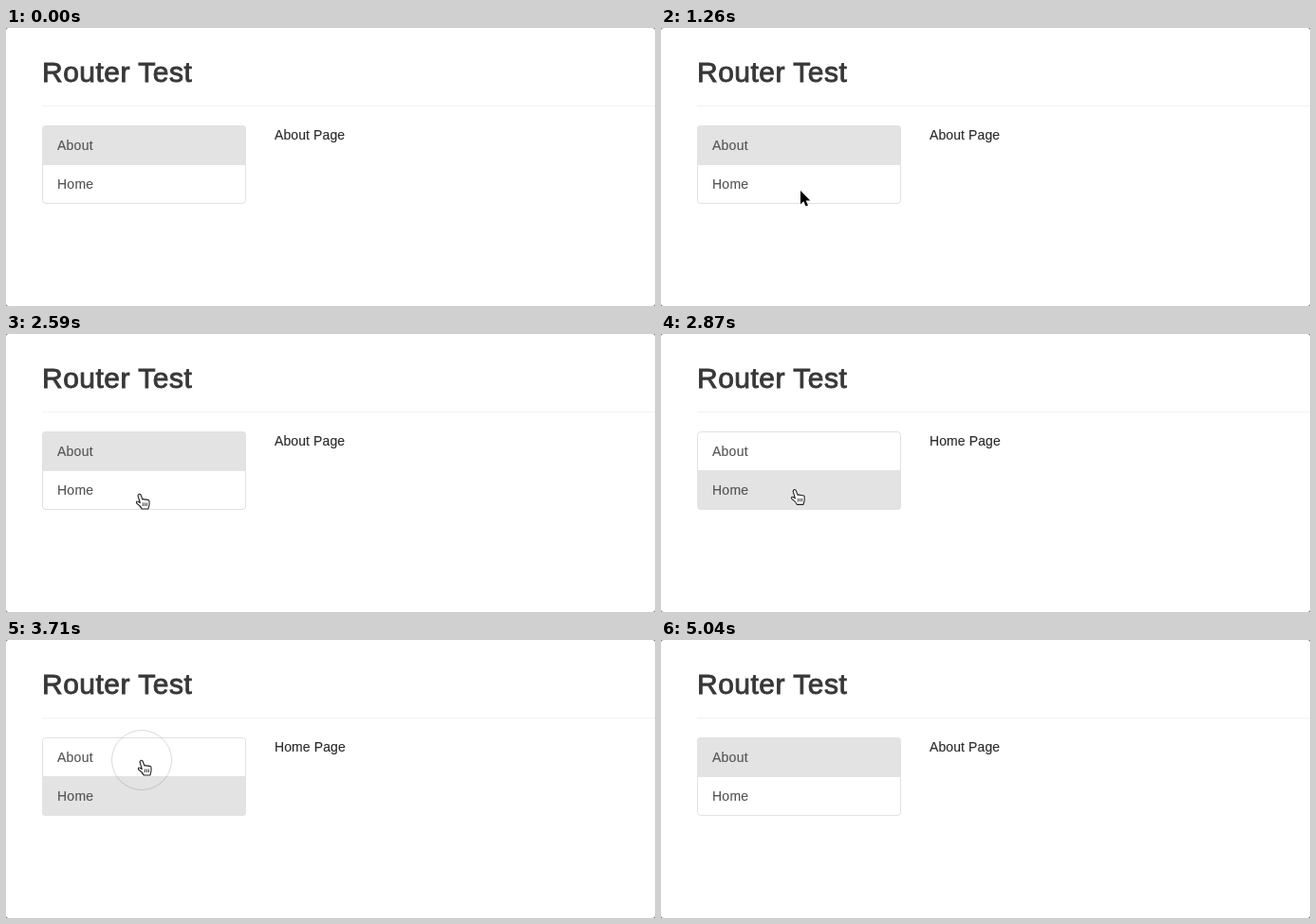
Recreate the animation shown at these times as an HTML page. Size 684 by 294 pixels, loop 5180 ms.

```html
<!DOCTYPE html>
<html lang="en">
<head>
<meta charset="utf-8">
<title>Router Test</title>
<style>
  html, body { margin: 0; width: 100%; height: 100%; overflow: hidden; background: #777; }
  svg { display: block; width: 684px; height: 294px; }
  text { font: 14px "Liberation Sans", Arial, sans-serif; letter-spacing: .1px; fill: #2b2b2b; stroke: #2b2b2b; stroke-width: .15px; }
  .title { font-size: 30px; letter-spacing: .5px; fill: #383838; stroke: #383838; stroke-width: .9px; }
  .item { letter-spacing: .25px; fill: #555; stroke: #555; }
  .box { fill: none; stroke: #e1e1e1; }
</style>
</head>
<body>
<svg viewBox="0 0 684 294">
  <clipPath id="listShape"><rect x="38" y="103" width="215" height="83" rx="4"/></clipPath>
  <rect width="684" height="294" rx="3" fill="#fff"/>
  <text class="title" x="38" y="57">Router Test</text>
  <path d="M38 82.5H684" stroke="#f2f2f2"/>

  <rect class="box" x="38.5" y="103.5" width="214" height="82" rx="3.5"/>
  <g clip-path="url(#listShape)"><rect id="active" x="38" width="215" height="42" fill="#e3e3e3"/></g>
  <text class="item" x="54" y="129">About</text>
  <text class="item" x="54" y="170">Home</text>
  <text id="page" x="283" y="118"></text>

  <g id="cursor">
    <circle id="ring" r="31.5" fill="none" stroke="#000" stroke-opacity=".15"/>
    <path id="arrow" d="M0 0V14.5L3.3 11.3 5.6 16.6 8 15.6 5.7 10.4H10.3Z" stroke="#fff" stroke-width="1.6" paint-order="stroke"/>
    <g id="hand" fill="#fff" stroke="#222" stroke-width="1.1" stroke-linejoin="round">
      <path d="M-2 2Q-1-1 1 1L3 6Q4 5 5.2 6.2 6.5 5.4 7.7 6.5 10 6 10 8V11Q10 13 8.8 16H2.2Q1 13-3.3 10 -4.5 7-1.2 8.5L.3 9.5Z"/>
      <path d="M3.4 9.5v3.5m2-3.5v3.5m2-3.5v3.5" stroke-width=".9"/>
    </g>
  </g>
</svg>
<script>
const LOOP = 5180, STEP = 70;
const ENTER = 280, LEAVE = 5040, HOVER = 1680;
const HOME_ON = 2660, HOME_OFF = 3850;
const CLICKS = [1120, 2450, 3710], CLICK_MS = 140;
const ENTRY = { x: 291, y: 257 };

// Each glide eases the pointer from wherever it rests to a new spot.
const glides = [
  { from: 280, to: 630, x: 153, y: 113 },
  { from: 770, to: 1120, x: 147, y: 172 },
  { from: 1610, to: 1890, x: 145, y: 122 },
  { from: 1960, to: 2310, x: 141, y: 169 },
  { from: 2800, to: 3220, x: 143, y: 106 },
  { from: 3290, to: 3570, x: 143, y: 127 },
  { from: 4620, to: LEAVE, x: 348, y: 290 }
];

const el = id => document.getElementById(id);
const show = (id, on) => el(id).setAttribute("visibility", on ? "visible" : "hidden");

function ease(t, from, to) {
  const u = Math.min(1, Math.max(0, (t - from) / (to - from)));
  return u * u * (3 - 2 * u);
}

function tipAt(t) {
  return glides.reduce((tip, glide) => {
    const u = ease(t, glide.from, glide.to);
    return { x: tip.x + (glide.x - tip.x) * u, y: tip.y + (glide.y - tip.y) * u };
  }, ENTRY);
}

function draw(now) {
  const t = Math.floor(now % LOOP / STEP) * STEP;
  const home = t >= HOME_ON && t < HOME_OFF;
  el("active").setAttribute("y", home ? 144 : 103);
  el("page").textContent = home ? "Home Page" : "About Page";

  const { x, y } = tipAt(t);
  const visible = t >= ENTER && t < LEAVE;
  const overList = t >= HOVER && x < 253 && y < 186;
  el("cursor").setAttribute("transform", `translate(${x} ${y})`);
  show("arrow", visible && !overList);
  show("hand", visible && overList);
  show("ring", CLICKS.some(at => t >= at && t < at + CLICK_MS));
}

const start = performance.now();
function tick() {
  draw(performance.now() - start);
  requestAnimationFrame(tick);
}
tick();
</script>
</body>
</html>
```
